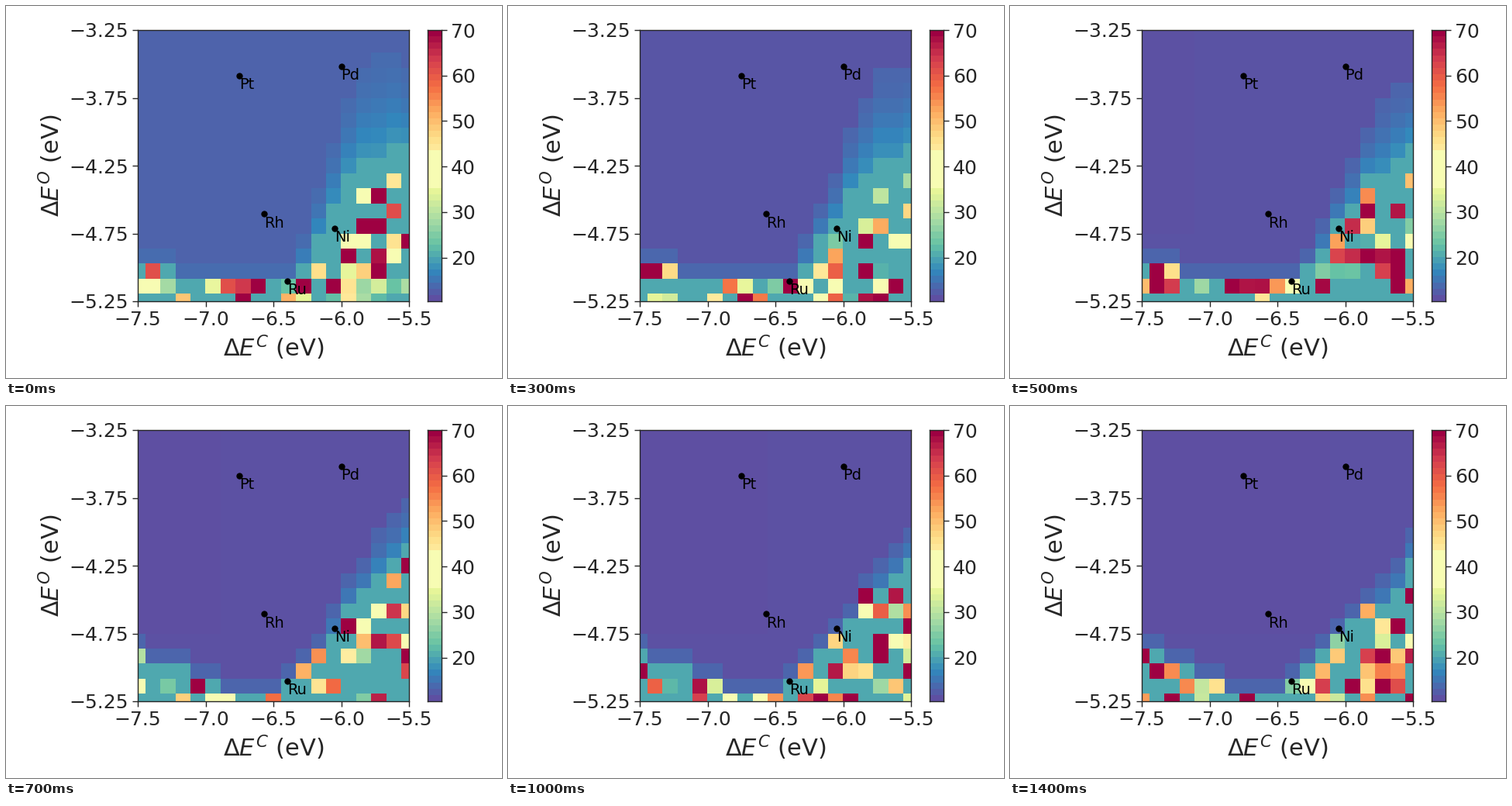
Write a matplotlib script that moves like this. It is 640 px wide and 480 px high and loops after 1500 ms.

```python
import numpy as np
import matplotlib
import matplotlib.pyplot as plt
from matplotlib.animation import FuncAnimation

W, H, DPI = 640, 480, 100
N, STEPS = 19, 15
VMIN, VMAX = 10.4, 70
INK = "#262626"
SETTLED = 0.157

plt.rcParams.update({
    "font.family": "DejaVu Sans", "mathtext.fontset": "dejavusans",
    "text.color": INK, "axes.labelcolor": INK, "axes.edgecolor": INK,
    "xtick.color": INK, "ytick.color": INK, "axes.linewidth": 1,
    "font.size": 18, "axes.labelsize": 22,
})

METALS = {
    "Pt": (-6.75, -3.585), "Pd": (-6.0, -3.517), "Rh": (-6.57, -4.607),
    "Ni": (-6.05, -4.71), "Ru": (-6.395, -5.10),
}


def front_shape(step):
    """Height of the front and of the blue ramp below it, per column."""
    col = np.arange(N)
    late = 1 - np.exp(-(step / 6.5) ** 2)
    bulge = 8 * (1 - late) * np.exp(-((col - 15.5 - 0.15 * step) / 3.5) ** 2)
    left = np.maximum(3.5 - late, 4.5 + late - (0.22 + 0.25 * late) * col)
    right = 2.1 + 1.1 * (col - 9) + bulge
    ramp = np.round(1 + 0.6 * bulge) + (col > 15)
    return np.floor(np.maximum(left, right)), ramp, late


def field(step):
    """Fractions of the colour range, row 0 at the bottom."""
    rng = np.random.default_rng(40 + step)
    front, ramp, late = front_shape(step)
    row, col = np.mgrid[:N, :N]

    # Calm region cools down, with a faint second tone moving right
    base = 0.036 * np.exp(-step / 2.7)
    lifted = (col >= step - 1) | (row <= 4)
    grid = base + 0.005 * late * lifted

    # Blue ramp from the front down to the settled tone
    depth = front - 1 - row
    start = 0.04 + 0.4 * base
    slope = (np.maximum(depth, 0) / ramp) ** 1.6
    grid = np.where(depth >= 0, start + (0.14 - start) * slope, grid)
    grid[depth >= ramp] = SETTLED

    # Unstable cells flicker across the whole scale
    hot = (depth >= 1.3 * ramp - 0.3) & (rng.random((N, N)) < 0.45)
    return np.where(hot, SETTLED + 1.1 * rng.random((N, N)), grid).clip(0, 1)


def flat_middle(frac):
    """Merge the pale centre of the scale into one tone."""
    return np.where((frac > 0.417) & (frac < 0.551), 0.47, frac)


def add_axes(x, y, w, h):
    ax = fig.add_axes([x / W, y / H, w / W, h / H])
    ax.tick_params(length=5, width=1, pad=3.5)
    return ax


fig = plt.figure(figsize=(W / DPI, H / DPI), dpi=DPI, facecolor="white")
ax = add_axes(170, 99, 350, 350)
cmap = matplotlib.colormaps["Spectral_r"]
style = dict(cmap=cmap, vmin=0, vmax=1, origin="lower", aspect="auto",
             interpolation="nearest")
half = 1 / (N - 1)
heat = ax.imshow(
    flat_middle(field(0)), **style,
    extent=(-7.5 - half, -5.5 + half, -5.25 - half, -3.25 + half))
ax.set_xlim(-7.5, -5.5)
ax.set_ylim(-5.25, -3.25)
ax.set_xticks(np.arange(-7.5, -5.4, 0.5))
ax.set_yticks(np.arange(-5.25, -3.2, 0.5))
ax.set_xlabel(r"$\Delta E^C$ (eV)")
ax.set_ylabel(r"$\Delta E^O$ (eV)")

for name, (x, y) in METALS.items():
    ax.plot(x, y, "o", color="black", ms=6, mew=0)
    ax.text(x, y - 0.098, name, color="black", fontsize=14, va="baseline")

bar = add_axes(544, 99, 18, 350)
bands = flat_middle(np.linspace(0, 1, 43))
bar.imshow(bands[:, None], **style, extent=(0, 1, VMIN, VMAX))
bar.set_xticks([])
bar.yaxis.tick_right()
bar.set_yticks(range(20, 71, 10))


def draw(step):
    heat.set_data(flat_middle(field(step)))
    return [heat]


anim = FuncAnimation(fig, draw, frames=STEPS, interval=100, repeat=True,
                     repeat_delay=0, blit=False)
plt.show()
```
